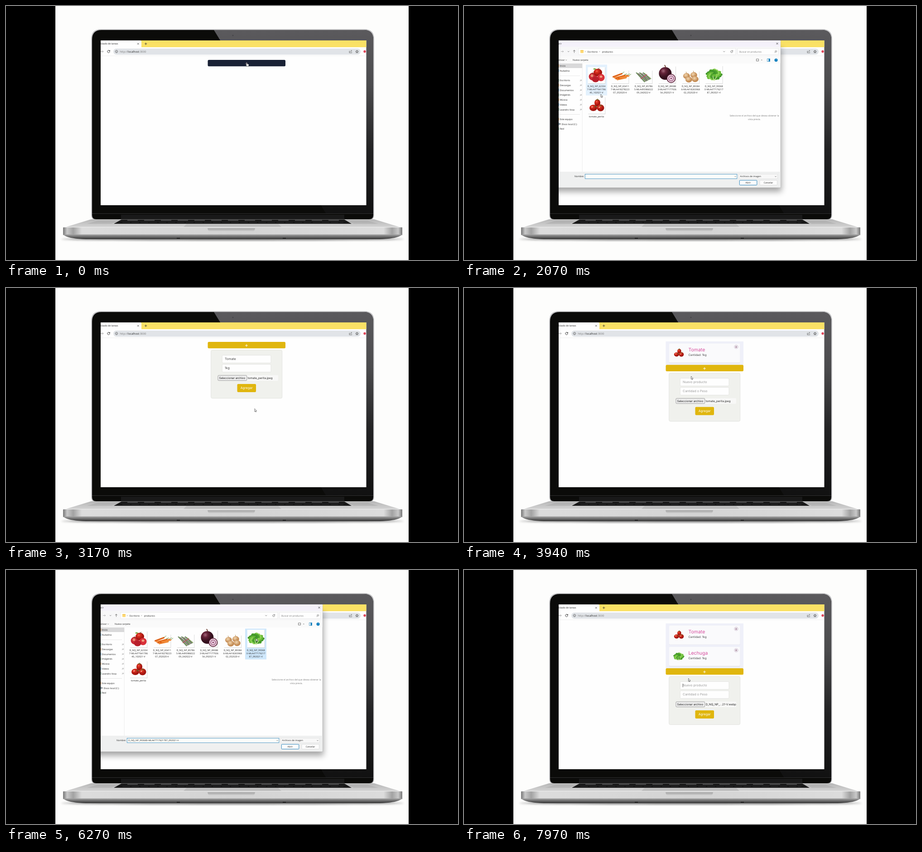
Write an HTML page that moves like this. It is 998x561 px and loops after 8000 ms.

```html
<!DOCTYPE html>
<html lang="es">
<head>
<meta charset="utf-8">
<title>Listado de tareas</title>
<style>
html, body { margin: 0; width: 100%; height: 100%; overflow: hidden; background: #000; }
svg { display: block; width: 100%; height: 100%; }
text { font-family: Inter, sans-serif; text-rendering: geometricPrecision; white-space: pre; }
.ui text { font-family: "Open Sans", sans-serif; font-size: 5.1px; fill: #222; }
.line { fill: none; stroke: #333; stroke-width: .8; }
</style>
</head>
<body>
<svg viewBox="0 0 998 561">
  <defs>
    <linearGradient id="glare" x2="0" y2="1">
      <stop offset="0" stop-color="#5b5a5d"/><stop offset=".3" stop-color="#4b4b4d"/>
      <stop offset=".65" stop-color="#222223"/><stop offset="1" stop-color="#111"/>
    </linearGradient>
    <linearGradient id="deck" x2="0" y2="1">
      <stop offset="0" stop-color="#b6b6b6"/><stop offset="1" stop-color="#d6d6d6"/>
    </linearGradient>
    <linearGradient id="front">
      <stop offset="0" stop-color="#777"/><stop offset=".012" stop-color="#c9c9c9"/>
      <stop offset=".03" stop-color="#a2a2a2"/><stop offset=".055" stop-color="#dcdcdc"/>
      <stop offset=".5" stop-color="#d3d3d3"/><stop offset=".945" stop-color="#dcdcdc"/>
      <stop offset=".97" stop-color="#a2a2a2"/><stop offset=".988" stop-color="#c9c9c9"/>
      <stop offset="1" stop-color="#777"/>
    </linearGradient>
    <linearGradient id="lip" x2="0" y2="1">
      <stop offset="0" stop-color="#a5a5a5"/><stop offset=".5" stop-color="#6d6d6d"/><stop offset="1" stop-color="#333"/>
    </linearGradient>
    <linearGradient id="notch" x2="0" y2="1">
      <stop offset="0" stop-color="#a3a3a3"/><stop offset="1" stop-color="#dadada"/>
    </linearGradient>
    <radialGradient id="tomatoRed" cx=".38" cy=".32">
      <stop offset="0" stop-color="#f4735c"/><stop offset=".3" stop-color="#dc2f20"/><stop offset="1" stop-color="#a3150f"/>
    </radialGradient>
    <radialGradient id="onionRed" cx=".35" cy=".3">
      <stop offset="0" stop-color="#a3697c"/><stop offset=".4" stop-color="#652338"/><stop offset="1" stop-color="#34101d"/>
    </radialGradient>
    <radialGradient id="onionTan" cx=".4" cy=".35">
      <stop offset="0" stop-color="#f2d7b0"/><stop offset="1" stop-color="#c48b54"/>
    </radialGradient>
    <filter id="blur" x="-20%" y="-50%" width="140%" height="200%"><feGaussianBlur stdDeviation="2"/></filter>
    <filter id="soft" x="-10%" y="-10%" width="120%" height="125%"><feGaussianBlur stdDeviation="7"/></filter>
    <clipPath id="screen"><rect x="209" y="76" width="586.5" height="364"/></clipPath>
    <g id="tomato"></g><g id="lettuce"></g><g id="apple"></g>
    <g id="carrot"></g><g id="asparagus"></g><g id="onion"></g><g id="onions"></g>
  </defs>

  <rect x="109" width="780" height="561" fill="#fdfdfc"/>
  <g id="laptop">
    <path d="M188 73Q188 51 210 51H791Q813 51 813 73V462Q813 472 803 472H198Q188 472 188 462Z" fill="#c4c4c6"/>
    <path d="M190 74Q190 53 211 53H790Q811 53 811 74V462Q811 471 802 471H199Q190 471 190 462Z" fill="#0b0b09"/>
    <path d="M459 53L707 459H811V74Q811 53 790 53Z" fill="url(#glare)"/>
    <path d="M190 458.500H811" stroke="#303031"/>
    <rect x="254" y="461" width="493" height="10" fill="#191919"/>
    <circle cx="501" cy="65" r="1.500" fill="#464649"/>
    <ellipse cx="500" cy="515" rx="378" ry="3" fill="#555" opacity=".75" filter="url(#blur)"/>
    <path d="M188 471H813L875 490H126Z" fill="url(#deck)"/>
    <path d="M203 474H250L233 481H179ZM751 474H798L822 481H768Z" fill="#a9a9a9" opacity=".55"/>
    <path d="M255 471.500H747L763 481H238Z" fill="#191919"/>
    <path d="M268 473.500H735" stroke="#5c5c5e" stroke-width="1.500" stroke-dasharray="23 14"/>
    <path d="M257 478H745" stroke="#303033" stroke-dasharray="17 3"/>
    <path d="M399 481H601L608 488H392Z" fill="#bcbcbc"/>
    <path d="M126 490Q126 488 130 488H871Q875 488 875 490V506H126Z" fill="url(#front)"/>
    <path d="M127 488.500H874" stroke="#eee"/>
    <path d="M126 504.500H875Q866 514 825 515H176Q135 514 126 504.500Z" fill="url(#lip)"/>
    <path d="M445 491H550Q549 499 541 499H454Q446 499 445 491Z" fill="url(#notch)"/>
    <path d="M377 513H384M611 513H618" stroke="#222" stroke-width="2"/>
  </g>

  <g clip-path="url(#screen)">
    <rect x="209" y="76" width="587" height="364" fill="#fefefe"/>
    <g class="ui">
      <rect x="209" y="76" width="587" height="15" fill="#fae165"/>
      <path d="M205 76H296Q299 76 299 79V91H205Z" fill="#fefefe"/>
      <text x="206.200" y="85.300" style="font-size:5.2px">Listado de tareas</text>
      <path class="line" d="M290 81.800l3.400 3.400m0-3.400l-3.400 3.400M306 83.500h5.400m-2.700-2.700v5.400"/>
      <path class="line" d="M209 100.500h6m-2.300-2.300l2.300 2.300l-2.300 2.300" stroke="#888" style="stroke:#999"/>
      <path class="line" d="M229 99.300a2.700 2.700 0 1 0 .2 1.900M229.300 97.500v2.200h-2.200" style="stroke-width:1"/>
      <rect x="237" y="94" width="546" height="13.500" rx="6.700" fill="#e1e4e8"/>
      <path class="line" d="M244 97.800a2.700 2.700 0 1 0 .01 0M244 100.300v2M244 99v.7" style="stroke-width:.7"/>
      <text x="251.300" y="102.700" style="font-size:6px;fill:#777">http://<tspan fill="#222">localhost</tspan>:3000</text>
      <path class="line" d="M759 99.500h-1v4h5.500v-1.500M759.500 102q.5-3 3.700-3m-1.200-1.600l1.800 1.600l-1.800 1.600" style="stroke:#666"/>
      <path class="line" d="M775 97.700l.9 2 2.200.2-1.700 1.500.5 2.200-1.900-1.200-1.900 1.200.5-2.200-1.700-1.500 2.200-.2z"/>
      <circle cx="792" cy="100.500" r="2.700" fill="#e0475a"/>
      <path d="M209 110H796" stroke="#e9e9e9" stroke-width=".7"/>
    </g>
    <g id="items"></g>
    <g id="form">
      <rect id="add" x="445.500" y="119" width="171.500" height="14.200" rx="2.500"/>
      <path id="plus" d="M528.200 127h5.600m-2.800-2.800v5.600" stroke="#fff"/>
      <g id="panel">
        <rect x="452.700" y="137.200" width="157" height="106.400" rx="3" fill="#f0f1ed" stroke="#dedfdb" stroke-width=".8"/>
        <g fill="#fefefe" stroke="#dededb" stroke-width=".7">
          <rect x="477.300" y="148.500" width="107.700" height="17" rx="2"/>
          <rect x="477.300" y="168.700" width="107.700" height="17" rx="2"/>
        </g>
        <text id="name" x="483" y="159.200" font-size="7.050"/>
        <text id="qty" x="483" y="179.400" font-size="7.050"/>
        <path id="caret" stroke="#222" stroke-width=".7"/>
        <rect x="467" y="192.500" width="134" height="12.500" rx="2.500" fill="#f8f8f7"/>
        <rect id="pick" x="468" y="193" width="63.700" height="11.400" rx="1.500" stroke="#777" stroke-width=".7"/>
        <text x="470.500" y="201" font-size="6.200" fill="#111">Seleccionar archivo</text>
        <text id="file" x="533.500" y="201" font-size="6.250" fill="#222"/>
        <rect x="510.500" y="212" width="41.500" height="18" rx="2.200" fill="#e0b60e"/>
        <text x="531.200" y="223.400" font-size="7.100" fill="#fff" text-anchor="middle">Agregar</text>
      </g>
    </g>
    <g id="dialog" class="ui"></g>
    <path id="arrow" d="M0 0V6.500L1.500 5.200 2.500 7.500 3.500 7 2.500 4.900 4.500 4.700Z" fill="#fff" stroke="#222" stroke-width=".6"/>
    <path id="hand" d="M-.7 .3Q0-.5 .7 .3V2.800L4 3.600Q4.800 4 4.600 5.200L4 8H.4L-2.200 4.900Q-1.700 4-.7 4.700Z" fill="#fff" stroke="#222" stroke-width=".6"/>
    <path id="beam" d="M-1.400-3.500h2.800M0-3.500v7M-1.400 3.500h2.800" stroke="#333" stroke-width=".7"/>
  </g>
</svg>
<script>
const LOOP = 8000;
const $ = id => document.getElementById(id);
const show = (id, on) => $(id).setAttribute('display', on ? 'inline' : 'none');
const ball = (x, y, rx, ry, fill) => `<ellipse cx="${x}" cy="${y}" rx="${rx}" ry="${ry}" fill="${fill}"/>`;
const stroke = (d, color, w) => `<path d="${d}" fill="none" stroke="${color}" stroke-width="${w}" stroke-linecap="round"/>`;
const label = (x, y, s, attrs = '') => `<text x="${x}" y="${y}" ${attrs}>${s}</text>`;
const box = (x, y, w, h, fill, attrs = '') => `<rect x="${x}" y="${y}" width="${w}" height="${h}" fill="${fill}" ${attrs}/>`;
const place = (id, x, y, s = 1) => `<use href="#${id}" transform="translate(${x} ${y}) scale(${s})"/>`;

// Produce pictures, each about 36 wide around its own centre
function drawProduce() {
  const red = 'url(#tomatoRed)';
  const stem = (x, y) => stroke(`M${x - 3} ${y + 1}L${x} ${y}L${x + 3} ${y + 1}M${x} ${y}v-2`, '#4e7a2c', 1);
  $('tomato').innerHTML = ball(2, -6, 6.5, 8, red) + ball(-7, 5, 8.5, 7, red) + ball(9, 5, 8, 7.500, red) +
    stem(2, -13) + stem(-2, 2) + stem(9, 0) + ball(-10, 3, 1.5, 1, '#ffc9bd') + ball(6, 4, 1.3, 1, '#ffc9bd');
  $('apple').innerHTML = ball(-8, 3, 9, 8.500, '#c92b35') + ball(3, -6, 9.500, 8.500, red) + ball(10, 5, 8, 8, '#d9313a') +
    ball(-2, 9, 8, 6.500, '#b81f2b') + ball(-10, 1, 3, 3, '#ec8a70') + ball(10, 3, 3, 2.500, '#efa083') +
    stroke('M3-12q1-4 3-4M-8-3l-1-3', '#65452c', 1) + ball(-4, -14, 3, 1.5, '#7ba640');
  let s = '';
  for (let i = 0; i < 6; i++) {
    const x = -15 + i * 3, y = 6 - Math.abs(i - 3) * 2;
    s += stroke(`M${x} ${y}L${x + 19} ${y - 7 + i % 2 * 3}`, i % 2 ? '#f18a38' : '#df6318', 3.3);
    s += stroke(`M${x + 20} ${y - 8 + i % 2 * 3}l4-3`, '#67963f', 1);
  }
  $('carrot').innerHTML = s;
  s = '';
  for (let i = 0; i < 8; i++)
    s += stroke(`M${-16 + i * 2.5} ${-9 + i % 3}L${2 + i * 2} ${11 - i}`, ['#54764b', '#8a9f68', '#786c70'][i % 3], 1.8);
  $('asparagus').innerHTML = s + stroke('M-6 4L7-5', '#b65b66', 1.8);
  $('onion').innerHTML = ball(-4, -3, 14, 14, 'url(#onionRed)') + stroke('M-3-17l-2-4', '#795044', 2) +
    ball(9, 8, 10, 10, '#561a34') + ball(9, 8, 8.500, 8.500, '#e6cbd9') + ball(9, 8, 6, 6, '#9a527c') +
    ball(9, 8, 4.500, 4.500, '#edd9e4') + ball(9, 8, 2, 2, '#9a527c');
  $('onions').innerHTML = [[-9, -3], [7, -5], [-4, 5], [10, 4]].map(([x, y]) =>
    ball(x, y, 7.500, 6.500, 'url(#onionTan)') + stroke(`M${x} ${y - 6}l-1-3`, '#b88e56', 1)).join('');
  s = '';
  for (let i = 0; i < 46; i++) {
    const a = i * 2.4, r = Math.sqrt((46 - i) / 46);
    const x = Math.cos(a) * r * 14, y = Math.sin(a) * r * 10;
    s += ball(x.toFixed(1), y.toFixed(1), 3.5, 2.5, ['#3f9429', '#67b936', '#8bd052', '#4ea42d'][i % 4]);
  }
  $('lettuce').innerHTML = s + stroke('M0 12l-2-9M1 12l5-8', '#cbe59b', 1.3);
}

function drawItems() {
  const item = (id, y, name, pic) => `<g id="${id}" transform="translate(0 ${y})">` +
    box(445.5, 118, 171.5, 52, '#eff0f9') + box(453, 123.700, 156.500, 42, '#dfe0e8', 'rx="2"') +
    box(453, 122.700, 156.500, 42, '#fafafc', 'rx="2"') + place(pic, 474, 143.500, pic === 'tomato' ? .66 : .72) +
    label(495.5, 140.200, name, 'font-size="10.5" fill="#d74f9f"') +
    label(495.5, 150.200, 'Cantidad: 1kg', 'font-size="6.3" fill="#444"') +
    ball(601, 130, 5, 4.700, '#e4dce5') + label(601, 132, 'x', 'font-size="6" fill="#6d3553" text-anchor="middle"') + '</g>';
  $('items').innerHTML = item('item0', 0, 'Tomate', 'tomato') + item('item1', 47.3, 'Lechuga', 'lettuce');
}

function drawDialog() {
  const line = (d, color = '#444', w = .7) => `<path class="line" d="${d}" style="stroke:${color};stroke-width:${w}"/>`;
  const mid = 'text-anchor="middle"', end = 'text-anchor="end"';
  let s = box(190, 92, 511, 318, '#000', 'opacity=".35" filter="url(#soft)"') +
    box(200, 76, 499, 325, '#fefefe', 'stroke="#aaa" stroke-width=".6"') + box(200, 76, 498.7, 14, '#f4f1fa') +
    box(200, 90, 498.7, 21.500, '#f7f7f8') + box(200, 111.500, 498.7, 15, '#fafafa') +
    label(215.5, 85, 'Abrir', end) + line('M689.500 81l4 4m0-4l-4 4', '#222') +
    line('M214 100.500h5.500m-2-2l2 2l-2 2', '#999') + line('M229 99.700l1.600 1.600l1.600-1.600') +
    line('M243.400 103.500v-6m-2.500 2.500l2.500-2.500l2.500 2.500') +
    box(253, 93.500, 347, 14, '#fefefe', 'stroke="#e3e3e3" stroke-width=".6"') +
    box(257, 97.500, 7, 6, '#f2bf42', 'rx=".8"') + box(257, 99, 7, 4.500, '#ffda75', 'rx=".8"') +
    label(267, 102.400, '›') + label(272.700, 102.500, 'Escritorio') + label(298.700, 102.400, '›') + label(304.700, 102.500, 'productos') +
    line('M572.500 99.700l1.800 1.800l1.800-1.800') + line('M593.200 99.700a2.300 2.300 0 1 0 .2 1.700M593.500 98v1.900h-1.900') +
    box(604, 93.500, 90, 14, '#fefefe', 'stroke="#e3e3e3" stroke-width=".6"') +
    label(608, 102.500, 'Buscar en productos', 'style="fill:#777"') + line('M688.700 98.500a1.700 1.700 0 1 0 .01 0M687.400 101.500l-1.700 1.700') +
    label(222.500, 121.400, 'Organizar', end) + line('M224.500 118.800l1.200 1.200l1.200-1.200') + label(240, 121.400, 'Nueva carpeta') +
    line('M645.500 117h5v4.500h-5zM656 120l1.300-1.300l1.300 1.300') + line('M669.500 116.500h6v6h-6z', '#1680bd') +
    box(672.500, 116.500, 3, 6, '#1680bd') + ball(689, 119.500, 3.500, 3.500, '#087bbd') +
    label(689, 121.300, '?', mid + ' style="fill:#fff"') +
    box(209, 127, 52, 10, '#d9d9da') + line('M261.300 127V366', '#e4e4e4') +
    line('M209 154H256M209 239.500H256', '#ddd');
  const places = [['Inicio', 134], ['Nubalina', 144.8], ['Escritorio', 166.2], ['Descargas', 176.9], ['Documentos', 187.6],
    ['Imágenes', 198.4], ['Música', 209.1], ['Videos', 219.800], ['Leandro Vosa', 230.5], ['Este equipo', 251.9], ['Disco local (C:)', 262.6], ['Red', 273.3]];
  places.forEach(([name, y], i) => {
    s += label(i === 10 ? 215.5 : 211.7, y, name) + line(`M209 ${y - 4}h1v4h-1`, ['#d58b3e', '#3b8bc1', '#528f72'][i % 3]);
    if (i > 1 && i < 9) s += line(`M256 ${y}l1.800-1.800m-1.300-1.300l2.600 2.600m-1-3.500l1.800 1.800l-1.500 1`, '#777', .6);
  });
  s += line('M209.500 260.500h4', '#555', 1.7);
  s += box(269, 129.5, 47, 68, '#e3f1fd', 'id="cell0"') + box(269, 199, 47, 50, '#cfe8fc', 'id="cell1"') + box(528, 129.5, 47, 68, '#cfe8fc', 'id="cell2"');
  const thumb = (x, top, h, pic, cy, k = 1) => box(x - 18.3, top + .8, 38, h, '#ccc') + box(x - 19, top, 38, h, '#fefefe') + place(pic, x, cy, k);
  [['apple', 292.500, 135, 62334, '7-MLA477641786', '40_102021-V'], ['carrot', 344.500, 142, 65411, '7-MLA418278223', '07_052020-V'],
   ['asparagus', 396.500, 142, 85786, '5-MLA495986022', '09_042022-V'], ['onion', 448.300, 133, 89088, '3-MLA477177936', '54_092021-V'],
   ['onions', 500.300, 144, 89384, '6-MLA418265968', '02_052020-V'], ['lettuce', 551.700, 132, 99368, '0-MLA477176217', '87_092021-V']
  ].forEach(([pic, x, top, id, b, c]) => {
    s += thumb(x, top, 171 - top, pic, (top + 171) / 2, pic === 'lettuce' ? 1.08 : 1);
    ['D_NQ_NP_' + id, b, c].forEach((row, i) => { s += label(x, 179 + i * 7.2, row, mid); });
  });
  s += thumb(292.500, 201, 37, 'tomato', 220) + label(292.500, 246.300, 'tomate_perita', mid) +
    label(641, 244.400, 'Seleccione el archivo del que desea obtener la', mid + ' style="fill:#777"') +
    label(641, 251.500, 'vista previa.', mid + ' style="fill:#777"') +
    box(200, 366, 498.7, 34.700, '#eff0f0') + label(265, 378.300, 'Nombre:', end) +
    box(267.300, 371.500, 335.500, 10, '#fefefa', 'stroke="#3087bd" stroke-width=".8"') +
    '<text id="picked" x="270" y="378.300"></text>' + line('M597.500 375.800l1.500 1.500l1.500-1.500') +
    box(607, 371.500, 85, 10, '#f8f8f8', 'stroke="#ddd" stroke-width=".6"') + label(609.500, 378.300, 'Archivos de imagen') +
    line('M686.500 375.800l1.500 1.500l1.500-1.500') +
    box(608.300, 385, 38.500, 10.500, '#fcfcfc', 'rx="1" stroke="#3087bd"') + label(627.500, 392, 'Abrir', mid) +
    box(653, 385, 38.500, 10.500, '#fcfcfc', 'rx="1" stroke="#d5d5d5" stroke-width=".7"') + label(672, 392, 'Cancelar', mid);
  $('dialog').innerHTML = s;
}

// Cursor stops: time, x, y
const path = [
  [0, 531.5, 125], [250, 531.5, 125], [520, 531, 157], [980, 531, 157], [1150, 531, 177], [1450, 531, 177],
  [1640, 502, 198], [1760, 502, 198], [2040, 302, 195], [2090, 302, 195], [2300, 293, 222], [2500, 293, 222],
  [3050, 549, 266.500], [3190, 549, 266.500], [3340, 532, 220], [3450, 532, 220], [3800, 501.5, 195], [5480, 501.5, 195],
  [5680, 514, 247], [5840, 514, 247], [6180, 552, 151], [6400, 552, 151], [6700, 531, 287], [6950, 531, 287],
  [7300, 531, 271], [7620, 531, 271], [7880, 495.5, 239.500], [LOOP, 495.5, 239.500]
];

function cursorAt(t) {
  const i = path.findIndex(p => p[0] > t);
  const [t0, x0, y0] = path[i - 1], [t1, x1, y1] = path[i];
  const u = (t - t0) / (t1 - t0), k = u * u * (3 - 2 * u);
  return [x0 + (x1 - x0) * k, y0 + (y1 - y0) * k];
}

const typed = (text, t, from, to) =>
  text.slice(0, Math.max(0, Math.ceil((t - from) / (to - from) * text.length)));

function field(id, value, hint) {
  $(id).textContent = value || hint;
  $(id).setAttribute('fill', value ? '#444' : '#999');
}

function render(t) {
  const count = t < 3400 ? 0 : t < 7570 ? 1 : 2;
  const open = t >= 200;
  const picking = t >= 1750 && t < 2500 || t >= 5840 && t < 6420;
  const dy = [0, 50.800, 98][count];
  const [x, y] = cursorAt(t), fy = y - dy;
  const inside = (l, top, r, b) => !picking && x > l && x < r && fy > top && fy < b;

  show('item0', count > 0);
  show('item1', count > 1);
  show('panel', open);
  show('dialog', picking);
  $('form').setAttribute('transform', `translate(0 ${dy})`);

  const overAdd = inside(445, 119, 617, 133);
  $('add').setAttribute('fill', overAdd ? '#192135' : '#e0b60e');
  $('plus').setAttribute('stroke', overAdd ? '#8d7486' : '#fff');
  $('pick').setAttribute('fill', inside(468, 193, 532, 205) ? '#e1e3e1' : '#efefef');

  const name = count === 0 ? typed('Tomate', t, 560, 980) : count === 1 ? typed('Lechuga', t, 4300, 4880) : '';
  const qty = count === 0 ? typed('1kg', t, 1200, 1430) : count === 1 ? typed('1kg', t, 5130, 5420) : '';
  field('name', name, 'Nuevo producto');
  field('qty', qty, 'Cantidad o Peso');
  $('file').textContent = t < 2500 ? 'Ningún archivo selec.' : t < 6420 ? 'tomate_perita.jpeg' : 'D_NQ_NP_...21-V.webp';

  const onName = t > 520 && t < 1100 || t >= 3400 && t < 5000 || count === 2;
  const onQty = t >= 1150 && t < 1640 || t >= 5000 && t < 5600;
  const since = t - (count === 2 ? 7570 : count === 1 ? 3400 : 520);
  show('caret', (onName || onQty) && since % 1060 < 530);
  const box = $(onName ? 'name' : 'qty');
  const cx = 483.3 + ((onName ? name : qty) ? box.getComputedTextLength() : 0);
  $('caret').setAttribute('d', `M${cx} ${onName ? 153 : 173.200}v8`);

  if (picking) {
    const late = t > 5000;
    show('cell0', !late && x > 269 && x < 316 && y < 198);
    show('cell1', !late && t > 2250);
    show('cell2', late && t > 6120);
    $('picked').textContent = late ? (t > 6250 ? 'D_NQ_NP_993680-MLA47717621787_092021-V' : '') : t > 2350 ? 'tomate_perita' : '';
  }

  const hand = overAdd || open && inside(510, 212, 552, 230);
  const beam = open && (inside(477, 148, 585, 166) || inside(477, 168, 585, 186));
  const kinds = { arrow: !hand && !beam, hand, beam };
  for (const id in kinds) {
    show(id, kinds[id]);
    $(id).setAttribute('transform', `translate(${x} ${y})`);
  }
}

drawProduce();
drawItems();
drawDialog();
const start = performance.now();
function tick() {
  render((performance.now() - start) % LOOP);
  requestAnimationFrame(tick);
}
tick();
</script>
</body>
</html>
```
